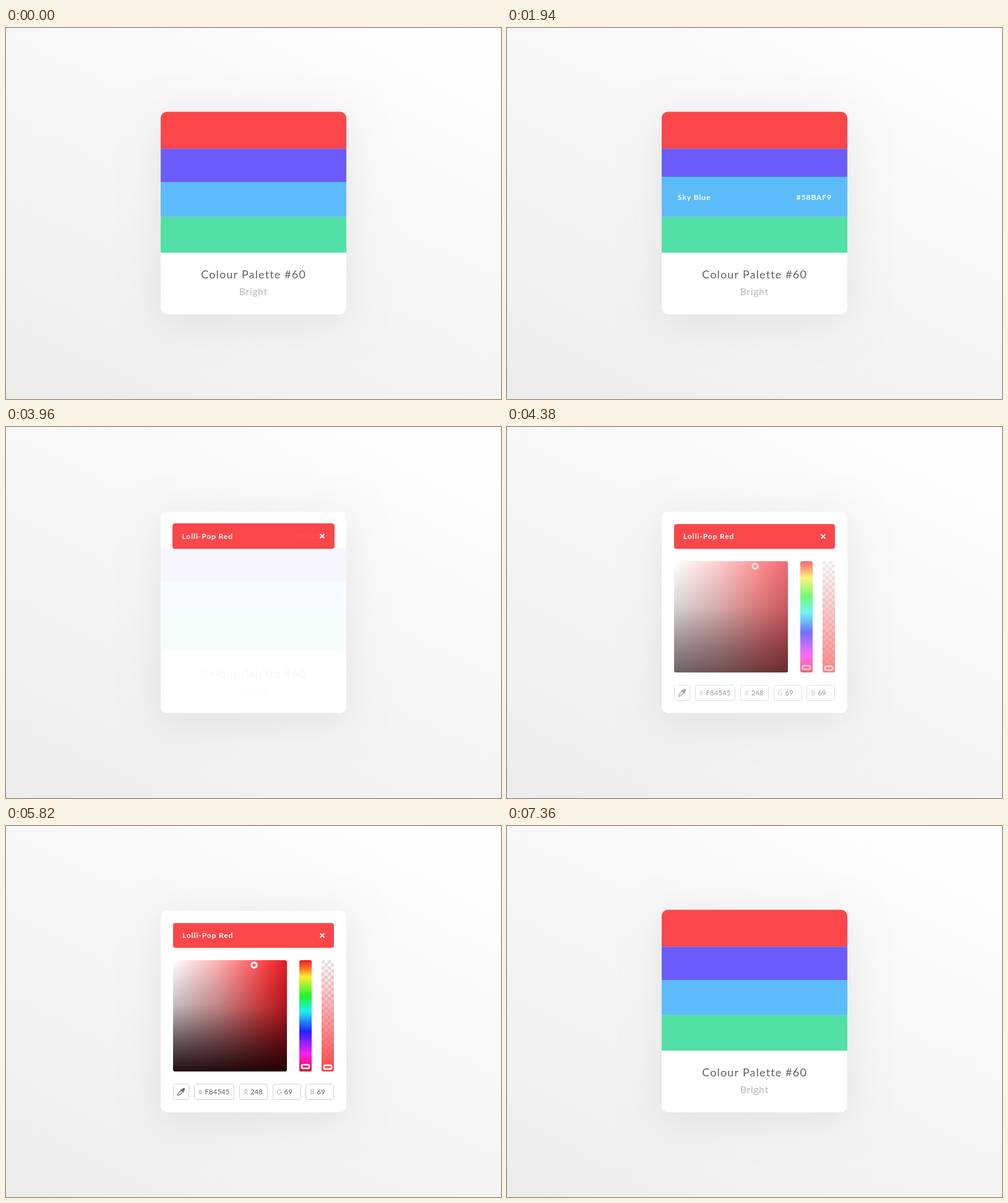
Animation, 800 px wide and 600 px high, one loop 7400 ms. Source, as an HTML page with a canvas:

```html
<!DOCTYPE html>
<html lang="en">
<head>
<meta charset="utf-8">
<title>Colour palette</title>
<style>
  html, body { margin: 0; width: 100%; height: 100%; overflow: hidden; background: #f6f6f6; }
  canvas { display: block; width: 800px; height: 600px; }
</style>
</head>
<body>
<canvas id="stage" width="800" height="600"></canvas>
<script>
const ctx = document.getElementById('stage').getContext('2d');
const LOOP = 7400;
const RED = '#fb474a';

const stripes = [
  { name: 'Lolli-Pop Red', hex: '#F84545', fill: RED, top: 135.5, bottom: 195.2, grow: 0, on: 2705, off: 6500 },
  { name: 'Vibrant Purple', hex: '#6758FB', fill: '#6b5bfa', top: 195.2, bottom: 249, grow: 9.2, on: 1970, off: 2800 },
  { name: 'Sky Blue', hex: '#58BAF9', fill: '#5bbcf9', top: 249, bottom: 305.8, grow: 8.3, on: 1235, off: 2065 },
  { name: 'Seafoam Green', hex: '#48E1A3', fill: '#51e0a5', top: 305.8, bottom: 363.3, grow: 8, on: 500, off: 1330 }
];

const mix = (a, b, p) => a + (b - a) * p;
const ease = p => p < 0.5 ? 2 * p * p : 1 - 2 * (1 - p) * (1 - p);
const ramp = (t, start, length) => ease(Math.min(1, Math.max(0, (t - start) / length)));
const pulse = (t, on, inTime, off, outTime) => ramp(t, on, inTime) * (1 - ramp(t, off, outTime));

function gradient(x0, y0, x1, y1, stops) {
  const g = ctx.createLinearGradient(x0, y0, x1, y1);
  stops.forEach(([at, colour]) => g.addColorStop(at, colour));
  return g;
}

function box(x, y, w, h, r) {
  ctx.beginPath();
  ctx.roundRect(x, y, w, h, r);
}

function fillBox(x, y, w, h, r, fill) {
  box(x, y, w, h, r);
  ctx.fillStyle = fill;
  ctx.fill();
}

// y is the middle of the capital letters
function text(str, x, y, size, colour, { weight = 400, spacing = 0, align = 'left' } = {}) {
  ctx.font = `${weight} ${size}px Lato, "Open Sans", sans-serif`;
  ctx.letterSpacing = spacing + 'px';
  ctx.textAlign = align;
  ctx.fillStyle = colour;
  const shift = { left: 0, center: spacing / 2, right: spacing }[align];
  ctx.fillText(str, x + shift, y + size * 0.36);
}

function withAlpha(alpha, draw) {
  if (alpha <= 0) return;
  ctx.save();
  ctx.globalAlpha *= alpha;
  draw();
  ctx.restore();
}

function label(str, x, y, align) {
  text(str, x, y, 12, '#fff', { weight: 700, spacing: 0.9, align });
}

function drawBackground() {
  ctx.fillStyle = gradient(800, 0, 400, 800, [[0, '#ffffff'], [1, '#ececec']]);
  ctx.fillRect(0, 0, 800, 600);
  ctx.save();
  ctx.shadowColor = 'rgba(0,0,0,0.07)';
  ctx.shadowBlur = 60;
  ctx.shadowOffsetY = 10;
  fillBox(250, 137, 300, 326, 10, '#fff');
  ctx.restore();
}

function drawHeader(t, open) {
  const s = stripes[0];
  const hover = pulse(t, s.on, 300, s.off, 300);
  const x = mix(250, 270, open), y = mix(s.top, 157, open);
  const w = mix(300, 260, open), h = mix(s.bottom - s.top, 40, open);
  const top = mix(10, 4, open), low = mix(0, 4, open);
  const slide = -2.5 * (1 - hover);
  const mid = mix(165.5, 177, open);
  fillBox(x, y, w, h, [top, top, low, low], s.fill);
  withAlpha(hover, () => label(s.name, mix(276, 285, open) + slide, mid));
  withAlpha(hover * (1 - open), () => label(s.hex, 524 + slide, mid, 'right'));
  withAlpha(open, () => {
    ctx.strokeStyle = '#fff';
    ctx.lineWidth = 2;
    ctx.beginPath();
    for (const d of [-3.4, 3.4]) {
      ctx.moveTo(511 - d, mid - 3.4);
      ctx.lineTo(511 + d, mid + 3.4);
    }
    ctx.stroke();
  });
}

function drawStripe(s, t) {
  const hover = pulse(t, s.on, 300, s.off, 300);
  const top = s.top - s.grow * hover;
  const mid = (top + s.bottom) / 2;
  const slide = -2.5 * (1 - hover);
  ctx.fillStyle = s.fill;
  ctx.fillRect(250, top, 300, s.bottom - top);
  withAlpha(hover, () => {
    label(s.name, 276 + slide, mid);
    label(s.hex, 524 + slide, mid, 'right');
  });
}

function drawCaption() {
  text('Colour Palette #60', 399.5, 399, 18, '#626262', { spacing: 1.15, align: 'center' });
  text('Bright', 399.5, 427, 15, '#b5b5b5', { spacing: 1, align: 'center' });
}

function drawField() {
  fillBox(270, 217, 184, 180, 3, gradient(270, 0, 454, 0, [
    [0, '#ffffff'], [0.4, '#fdb0b2'], [0.78, '#ff4a4e'], [1, '#e31a24']
  ]));
  fillBox(270, 217, 184, 180, 3, gradient(0, 217, 0, 397, [
    [0, 'rgba(20,0,4,0)'], [0.4, 'rgba(20,0,4,0.25)'],
    [0.75, 'rgba(20,0,4,0.68)'], [1, 'rgba(20,0,4,0.94)']
  ]));
  ctx.beginPath();
  ctx.arc(401, 225, 4.2, 0, Math.PI * 2);
  ctx.strokeStyle = '#fff';
  ctx.lineWidth = 3;
  ctx.stroke();
}

function drawHandle(x, y) {
  box(x - 6.2, y - 3, 12.4, 6, 2.5);
  ctx.strokeStyle = '#fff';
  ctx.lineWidth = 2.7;
  ctx.stroke();
}

function drawBars() {
  fillBox(474, 217, 20, 180, 3, gradient(0, 217, 0, 397, [
    [0, '#e81c28'], [0.08, '#ff7a25'], [0.15, '#f8f030'], [0.32, '#22f528'],
    [0.46, '#20f0f0'], [0.64, '#2222fa'], [0.74, '#9020fa'],
    [0.84, '#f820f0'], [0.93, '#fa1090'], [1, '#ea1626']
  ]));
  drawHandle(484, 389);

  ctx.save();
  box(510, 217, 20, 180, 3);
  ctx.clip();
  ctx.fillStyle = '#fff';
  ctx.fillRect(510, 217, 20, 180);
  ctx.fillStyle = '#e2e2e2';
  for (let row = 0; row < 36; row++)
    for (let col = row % 2; col < 4; col += 2)
      ctx.fillRect(510 + col * 5, 217 + row * 5, 5, 5);
  ctx.fillStyle = gradient(0, 217, 0, 397, [[0, 'rgba(251,71,74,0)'], [1, RED]]);
  ctx.fillRect(510, 217, 20, 180);
  ctx.restore();
  drawHandle(520, 390);
}

function drawDropper() {
  ctx.save();
  ctx.translate(283, 430);
  ctx.rotate(Math.PI / 4);
  fillBox(-1.9, -8, 3.8, 5.6, 1.9, '#666');
  fillBox(-3.5, -3.4, 7, 1.8, 0.8, '#666');
  ctx.beginPath();
  ctx.moveTo(-1.7, -1.6);
  ctx.lineTo(-1.7, 5);
  ctx.lineTo(0, 8);
  ctx.lineTo(1.7, 5);
  ctx.lineTo(1.7, -1.6);
  ctx.strokeStyle = '#666';
  ctx.lineWidth = 1.1;
  ctx.stroke();
  ctx.restore();
}

function drawInput(x, w, key, keyX, value, valueX) {
  box(x + 0.5, 417.5, w - 1, 25, 3);
  ctx.strokeStyle = '#cfcfcf';
  ctx.lineWidth = 1;
  ctx.stroke();
  text(key, keyX, 430, 11, '#b0b0b0');
  text(value, valueX, 430, 11, '#606060', { spacing: 0.3 });
}

function drawPicker() {
  drawField();
  drawBars();
  drawInput(270, 26, '', 0, '', 0);
  drawDropper();
  drawInput(304, 65, '#', 311, 'F84545', 321.5);
  drawInput(377, 46, 'R', 384.5, '248', 395);
  drawInput(431, 46, 'G', 437.5, '69', 449.5);
  drawInput(484, 46, 'B', 491.5, '69', 502.5);
}

function draw(t) {
  const open = pulse(t, 3500, 550, 6400, 450);
  const picker = pulse(t, 4080, 520, 6180, 320);
  drawBackground();
  drawHeader(t, open);
  withAlpha(1 - open, () => {
    stripes.slice(1).forEach(s => drawStripe(s, t));
    drawCaption();
  });
  withAlpha(picker, drawPicker);
}

const start = performance.now();
function frame() {
  draw((performance.now() - start) % LOOP);
  requestAnimationFrame(frame);
}
frame();
</script>
</body>
</html>
```
